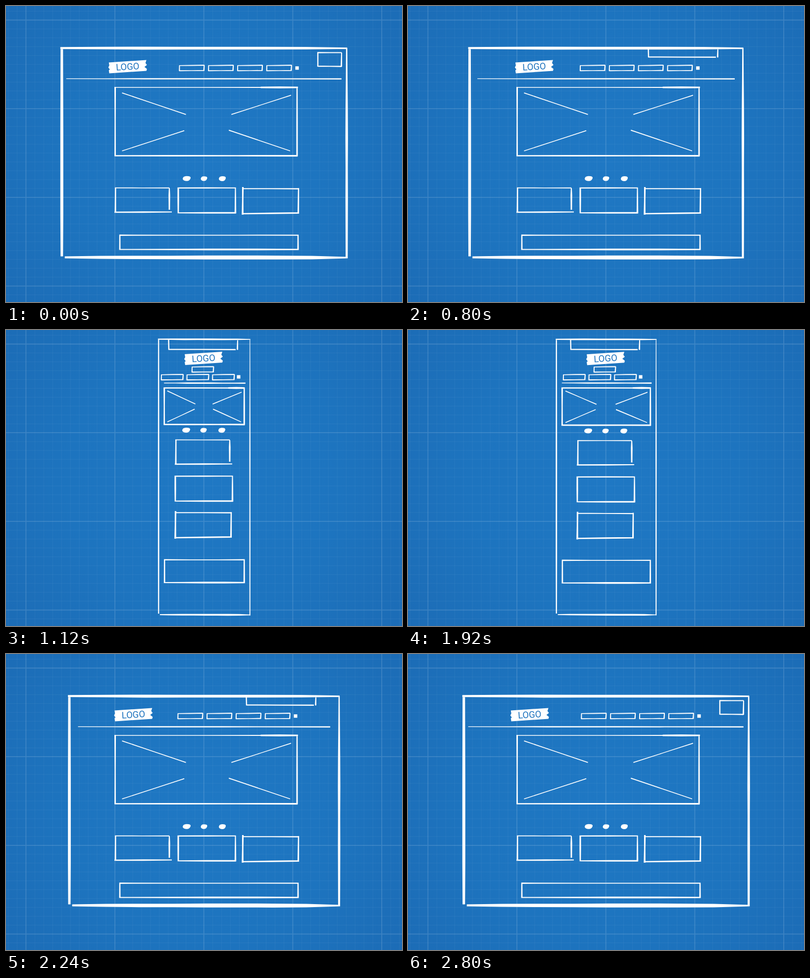
An HTML page that plays this animation: 800 px wide and 600 px high, repeating every 3.52 s.

```html
<!DOCTYPE html>
<html lang="en">
<head>
<meta charset="utf-8">
<title>Responsive wireframe</title>
<style>
  html, body { margin: 0; width: 100%; height: 100%; overflow: hidden; background: #1d72bd; }
  svg { display: block; width: 800px; height: 600px; }
  text { font: 400 18.5px Roboto, "Liberation Sans", sans-serif; text-anchor: middle; fill: #1d73be; }
</style>
</head>
<body>
<svg viewBox="0 0 800 600">
  <defs>
    <radialGradient id="glow" gradientUnits="userSpaceOnUse" cx="400" cy="300" r="500">
      <stop offset="0" stop-color="#1f78c4"/>
      <stop offset=".55" stop-color="#1d74bf"/>
      <stop offset="1" stop-color="#1c6cb6"/>
    </radialGradient>
  </defs>
  <rect width="800" height="600" fill="url(#glow)"/>
  <path id="minor" stroke="#fff" stroke-opacity=".055"/>
  <path id="major" stroke="#fff" stroke-opacity=".14" stroke-width="1.8"/>
  <path id="ink" fill="#fff"/>
  <g id="logo">
    <path fill="#fff" d="M-38-8 L38-13 36-7 39-3 34 1 39 5 38 9 -37 14 -38 8 -36 6 -39 2 -37-2Z"/>
    <text y="6.8" transform="rotate(-3.5)">LOGO</text>
  </g>
</svg>
<script>
const LOOP = 3520, STEP = 40;
// Page widths of the phone, tablet, narrow desktop and full desktop layouts
const STOPS = [184.5, 362.5, 546, 575.5];
const CENTER = 400.5;
const $ = id => document.getElementById(id);

const clamp = u => Math.max(0, Math.min(1, u));
const smooth = u => { u = clamp(u); return u * u * (3 - 2 * u); };
const lerp = (a, b, u) => a + (b - a) * u;
const during = (t, start, length) => smooth((t - start) / length);

function drawGrid() {
  const lines = { minor: '', major: '' };
  for (let i = -2; i < 43; i++) {
    const x = 40.3 + i * 17.97, y = 28.5 + i * 17.97;
    lines[i % 10 ? 'minor' : 'major'] += `M${x} 0V600M0 ${y}H800`;
  }
  for (const id in lines) $(id).setAttribute('d', lines[id]);
}

// Straight pen stroke whose thickness follows the given widths
function pen(x1, y1, x2, y2, ...widths) {
  const length = Math.hypot(x2 - x1, y2 - y1) || 1;
  const nx = (y1 - y2) / length / 2, ny = (x2 - x1) / length / 2;
  const last = widths.length - 1 || 1;
  if (widths.length < 2) widths.push(widths[0]);
  const side = sign => widths.map((w, i) =>
    `${(lerp(x1, x2, i / last) + sign * nx * w).toFixed(2)} ${(lerp(y1, y2, i / last) + sign * ny * w).toFixed(2)}`);
  return 'M' + [...side(1), ...side(-1).reverse()].join('L') + 'Z';
}

function box(l, t, r, b, top, right, bottom, left) {
  return pen(l - 1, t, r + 1, t, ...top) + pen(r, t - 1, r, b + 1, ...right) +
    pen(l - 1, b, r + 1, b, ...bottom) + pen(l, t - 1, l, b + 1, ...left);
}

function blob(x, y, rx, ry) {
  return `M${x - rx} ${y + 1}Q${x - rx} ${y - ry} ${x} ${y - ry}` +
    `Q${x + rx * 1.1} ${y - ry} ${x + rx} ${y - 1}` +
    `Q${x + rx * .8} ${y + ry} ${x} ${y + ry}Q${x - rx * .8} ${y + ry} ${x - rx} ${y + 1}Z`;
}

function mixer(width) {
  let i = width < STOPS[1] ? 0 : width < STOPS[2] ? 1 : 2;
  const u = (width - STOPS[i]) / (STOPS[i + 1] - STOPS[i]);
  const eased = i < 2 ? smooth(u) : clamp(u);
  return (phone, tablet, desktop, full = desktop) => {
    const values = [phone, tablet, desktop, full];
    return lerp(values[i], values[i + 1], eased);
  };
}

function page(left, right, top, bottom, width, mix) {
  const kx = lerp(.45, 1, (width - STOPS[0]) / (STOPS[3] - STOPS[0]));
  const ky = mix(.55, .65, 1), kb = mix(.45, .48, 1);
  const across = ws => ws.map(w => w * kx), down = (ws, k) => ws.map(w => w * k);
  return pen(left, top - 1, left, bottom - 3, ...across([5, 5.5, 6, 6, 6, 5])) +
    pen(right, top, right, bottom + 1, ...across([2.6, 3.4, 4.6, 5.2, 4.6, 5, 4.6, 4.2])) +
    pen(left - 3 * kx, top, right + 1, top + .3, ...down([4, 5, 6, 5.5, 5.5, 5.5, 5, 2.8], ky)) +
    pen(left + 6 * kx, bottom - 1, right + 1, bottom - .5, ...down([4, 6, 7, 7, 8, 8, 8, 7, 3], kb));
}

function hero(l, t, r, b, mix) {
  const at = (x1, y1, x2, y2, ...w) =>
    pen(lerp(l, r, x1), lerp(t, b, y1), lerp(l, r, x2), lerp(t, b, y2), ...w);
  const thin = mix(2.4, 1.7, 1.7);
  const gap = mix(.44, .42, .396);
  return box(l, t, r, b, [thin, thin, 2], [2.4, 3, 3], [2.6, 3, 2.6, 3.4], [3, 2.4, 2.8]) +
    at(.8, 0, 1.005, 0, 3, 4, 3) +
    at(.038, .08, .389, gap, 2, 1.6, 1.8) + at(mix(.605, .635, .639), gap, .967, .115, 1.8, 1.5, 1.8) +
    at(.038, .93, .38, mix(.58, .6, .633), 1.7, 1.4, 1.8) + at(mix(.61, .625, .625), mix(.58, .6, .626), .962, .93, 2, 1.8, 1.5);
}

function cards(mix) {
  const x1 = mix(122, 122, 0), y1 = mix(-146, -85, 0);
  const x2 = mix(-6, -6, 0), y2 = mix(-72.5, -11.5, 0);
  const x3 = mix(-136, -136, 0), y3 = mix(0, 61, 0);
  return pen(220 + x1, 368.7 + y1, 330 + x1, 368.7 + y1, 1.8, 1.6, 2) +
    pen(330 + x1, 369 + y1, 330 + x1, 413 + y1, 2, 3.4, 3, 2.8) +
    pen(219 + x1, 418 + y1, 335 + x1, 417.5 + y1, 2.6, 2.8, 2) +
    pen(221.3 + x1, 368 + y1, 221 + x1, 419 + y1, 2.4, 2.6, 3) +
    box(348 + x2, 368.7 + y2, 463.5 + x2, 419.3 + y2, [2, 2.4, 1.8], [2, 2.8, 3.4], [2, 3, 3], [3, 3.2, 2.6]) +
    pen(477 + x3, 370 + y3, 592 + x3, 370.5 + y3, 2.2, 1.8, 2.4) +
    pen(591 + x3, 369 + y3, 590.5 + x3, 421 + y3, 2.4, 2.8, 3.2) +
    pen(478 + x3, 421 + y3, 592 + x3, 419.5 + y3, 2.6, 3, 2.8) +
    pen(478.5 + x3, 367 + y3, 478 + x3, 423 + y3, 3.2, 2.8, 3.6);
}

function menu(width, mix) {
  const item = (x, y, w) => pen(x, y - 5, x + w, y - 5.8, 1.4, 2, 2) +
    pen(x + w, y - 6, x + w - .8, y + 5.5, 2, 2.5) +
    pen(x, y + 5.4, x + w, y + 4.9, 2.2, 1.6, 2) + pen(x + .5, y - 5.5, x + .3, y + 6, 1.8, 2.2);
  const badge = (x, y) => `M${x - 3.5} ${y - 3.5}h7v7h-7Z`;
  if (width < 255) {
    return item(375.5, 80, 44) + [0, 1, 2].map(i => item(313.5 + i * 51.7, 95.7, 44.5)).join('') + badge(470, 95);
  }
  const x = mix(283.5, 283.5, 347, 350), y = mix(87, 87, 125.8);
  return [0, 1, 2, 3].map(i => item(x + i * 58.8, y, 50.5)).join('') + badge(x + 238, y);
}

// The corner button widens into a tab that hangs from the top of the page
function tab(open, top, mix) {
  const l = lerp(630, mix(328.5, 328.5, 485.5), open), r = lerp(678, mix(468, 468, 626), open);
  const t = lerp(94.5, top + 2, open), b = lerp(122, top + mix(20.5, 20, 18), open);
  const lid = open < 1 ? pen(l - 1, t, r, t, 2.4, 2, 2.2) : '';
  return lid + pen(l, t - 1, l + .5 * open, b + 1, 2.4, 2.4) + pen(l, b, r - 4 * open, b + .5, 2.6, 2.2, 2.6) +
    pen(r, t, r - .5, b + 1, 2, 3);
}

function render(t) {
  const shrink = during(t, 744, 376) - during(t, 1863, 455);
  const open = during(t, 560, 160) - during(t, 2300, 100);
  const width = lerp(STOPS[3], STOPS[0], shrink);
  const mix = mixer(width);
  const left = CENTER - width / 2, right = CENTER + width / 2;
  const top = mix(18.7, 24, 85.3), bottom = mix(578, 573, 510.5);
  const lineY = mix(107.8, 101.7, 147.7);
  const heroTop = mix(117.5, 119.5, 165);
  const dotY = mix(203, 261.3, 349.7), dotX = mix(-1, -1, 0);
  const footTop = mix(465.8, 510.3, 464.6);

  $('ink').setAttribute('d',
    page(left, right, top, bottom, width, mix) +
    pen(left + mix(11, 12, 17.5, 9), lineY - .3, right - mix(9, 12.5, 18, 10.5), lineY, 1.4, 1.6, 2.6, 2.6, 2.6, 2, 2.2, 2.6) +
    hero(Math.max(220.5, left + mix(11.5, 15, 15)), heroTop,
      Math.min(588, right - mix(11.5, 13, 13)), mix(191.5, 246.5, 303.5), mix) +
    blob(365 + dotX, dotY, 8, 5) + blob(400 + dotX, dotY + .3, 6.5, 4.7) + blob(437 + dotX, dotY + .2, 7, 5) +
    cards(mix) +
    box(Math.max(230, left + mix(12, 15, 15)), footTop, Math.min(590, right - mix(11.5, 17.5, 17.5)),
      mix(512, 539, 493.5), [2.6, 1.8, 1.8, 2.4], [2.4, 3], [2, 2.4, 3.6, 3.4, 2.4], [2.4, 2.8]) +
    menu(width, mix) +
    tab(open, top, mix));
  $('logo').setAttribute('transform', `translate(${mix(399, 399, 257.3, 245.7)} ${mix(57, 64, 122.5)})`);
}

drawGrid();
render(0);
let begin;
requestAnimationFrame(function tick(now) {
  begin ??= now;
  render(Math.floor((now - begin) % LOOP / STEP) * STEP);
  requestAnimationFrame(tick);
});
</script>
</body>
</html>
```
